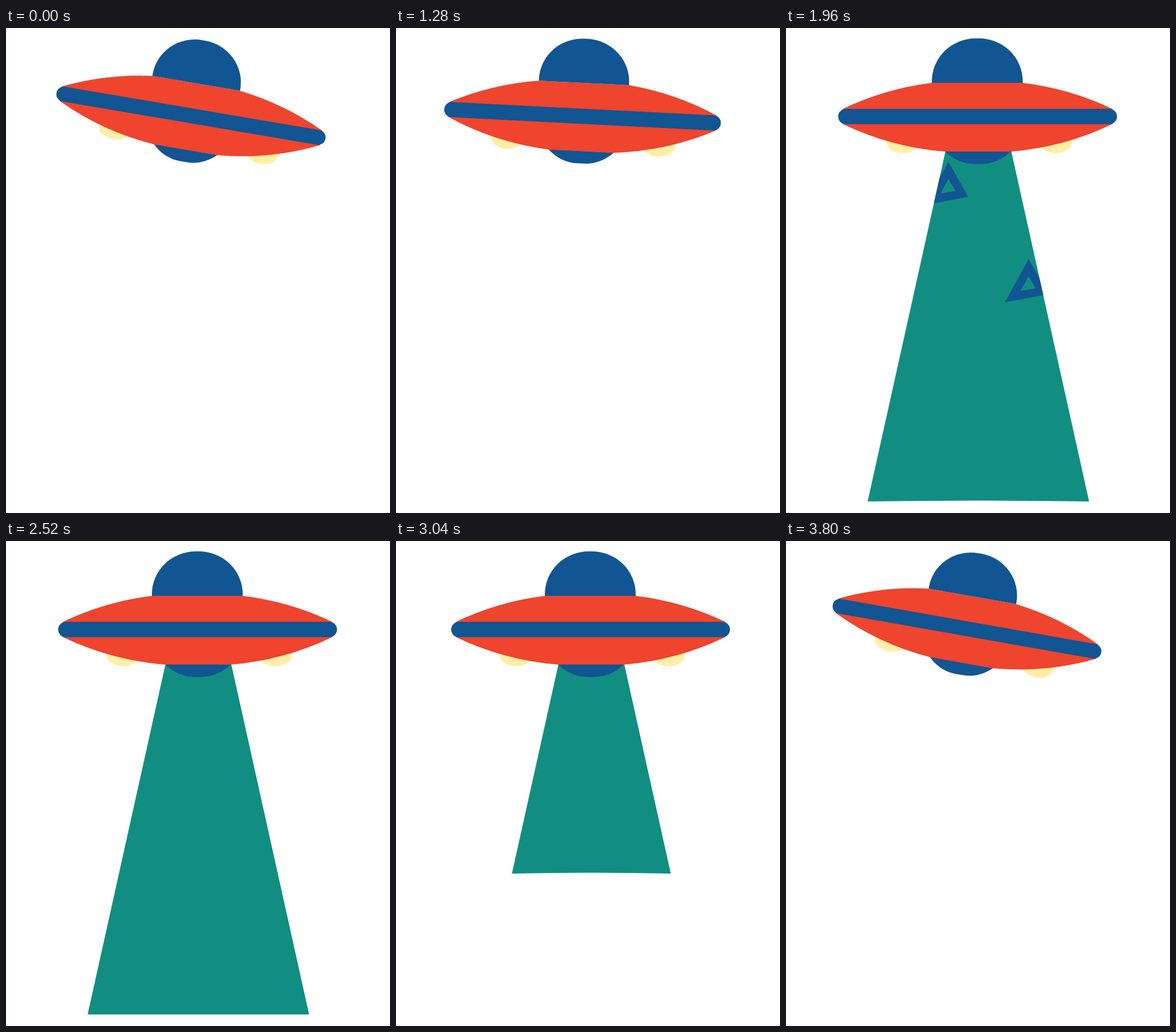
An HTML page with a canvas that plays this animation: 666 by 840 pixels, repeating every 3840 ms.

```html
<!DOCTYPE html>
<html lang="en">
<head>
<meta charset="utf-8">
<title>Flying saucer</title>
<style>
  html, body { margin: 0; width: 100%; height: 100%; overflow: hidden; background: #fff; }
  canvas { display: block; }
</style>
</head>
<body>
<canvas id="stage" width="666" height="840"></canvas>
<script>
const ctx = document.getElementById('stage').getContext('2d');
const LOOP = 3840, STEP = 40, HOME = 332.3;
const BLUE = '#115592', RED = '#ef442d', YELLOW = '#ffeea6', TEAL = '#118e81';

// Turning points of the flight as [time, value]; times past LOOP wrap round
const sway = [[3003, HOME], [3230, 364], [3640, 286], [4180, 380], [4770, 286], [5202, HOME]];
const tilts = [[3230, 0], [3640, 11.5], [4180, 6.5], [4650, -11.3], [5120, 2.9], [5202, 0]];

// Ship parts, relative to the middle of its band
const body = new Path2D(`M-234-13A500 500 0 0 1-79-58.2H78A500 500 0 0 1 234-13V13
  A500 500 0 0 1 58 60.8H-56.5A500 500 0 0 1-234 13Z`);
const dome = new Path2D('M-79.3-58.2V-61A76 74.3 0 0 1-3.3-135.3H2.5A76 74.3 0 0 1 78.3-61V-58.2Z');
const belly = new Path2D('M-56.5 60.3C-41 76-22 82.2-6 82.2H7C23 82.2 42 76 58 60.3Z');
const band = new Path2D();
band.roundRect(-241.8, -13.2, 483.6, 26.4, 13.2);
const lights = new Path2D();
for (const x of [-129.3, 135.2]) {
  lights.moveTo(x + 29, 43.5);
  lights.ellipse(x, 43.5, 29, 20, 0, 0, 2 * Math.PI);
}
const triangle = new Path2D('M0 0L34 61L-41 75ZM0 30L12 51L-14 55Z');

const clamp = v => Math.min(1, Math.max(0, v));

function fill(path, color) {
  ctx.fillStyle = color;
  ctx.fill(path, 'evenodd');
}

// Steady travel from one turning point to the next
function along(points, t) {
  let value = points[0][1];
  for (let i = 1; i < points.length; i++) {
    const [t0, a] = points[i - 1], [t1, b] = points[i];
    value += (b - a) * clamp((t - t0) / (t1 - t0));
  }
  return value;
}

function beamLength(t) {
  const grow = 1 - (1 - clamp((t - 1330) / 645)) ** 3;
  const shrink = clamp((t - 2690) / 520) ** 2.4;
  return grow - shrink;
}

function drawBeam(t, x) {
  const length = beamLength(t);
  if (length <= 0) return;
  const top = 189, height = 631 * length, spread = 0.2225 * height;
  const left = x - 50.3, right = x + 53, bottom = top + height;
  const beam = new Path2D();
  beam.moveTo(left, top);
  beam.lineTo(right, top);
  beam.lineTo(right + spread, bottom);
  beam.quadraticCurveTo(x + 1, bottom - (length < 1 ? 3 : 0), left - spread, bottom);
  ctx.save();
  fill(beam, TEAL);
  ctx.clip(beam);
  drawTriangles((t - 1447) / 1073);
  ctx.restore();
}

// Both drift in from the sides while being pulled up ever faster
function drawTriangles(progress) {
  if (progress < 0 || progress >= 1) return;
  const drift = 183 * (1.037 - progress) ** 2, rise = 330 * progress ** 2;
  for (const [x, y] of [[339 - drift, 307], [363.7 + drift, 475.5]]) {
    ctx.save();
    ctx.translate(x, y - rise);
    fill(triangle, BLUE);
    ctx.restore();
  }
}

function drawShip(x, tilt) {
  const scale = 1 - 0.0022 * tilt;
  ctx.save();
  ctx.translate(x, 153.3 - 0.13 * Math.max(0, tilt));
  ctx.rotate(tilt * Math.PI / 180);
  ctx.scale(scale, scale);
  fill(lights, YELLOW);
  fill(belly, BLUE);
  fill(body, RED);
  fill(dome, BLUE);
  fill(band, BLUE);
  ctx.restore();
}

function render() {
  const t = Math.floor(performance.now() % LOOP / STEP) * STEP;
  const flight = t < 2000 ? t + LOOP : t;
  const x = along(sway, flight);
  ctx.clearRect(0, 0, 666, 840);
  drawBeam(t, x);
  drawShip(x, along(tilts, flight));
  requestAnimationFrame(render);
}
render();
</script>
</body>
</html>
```
